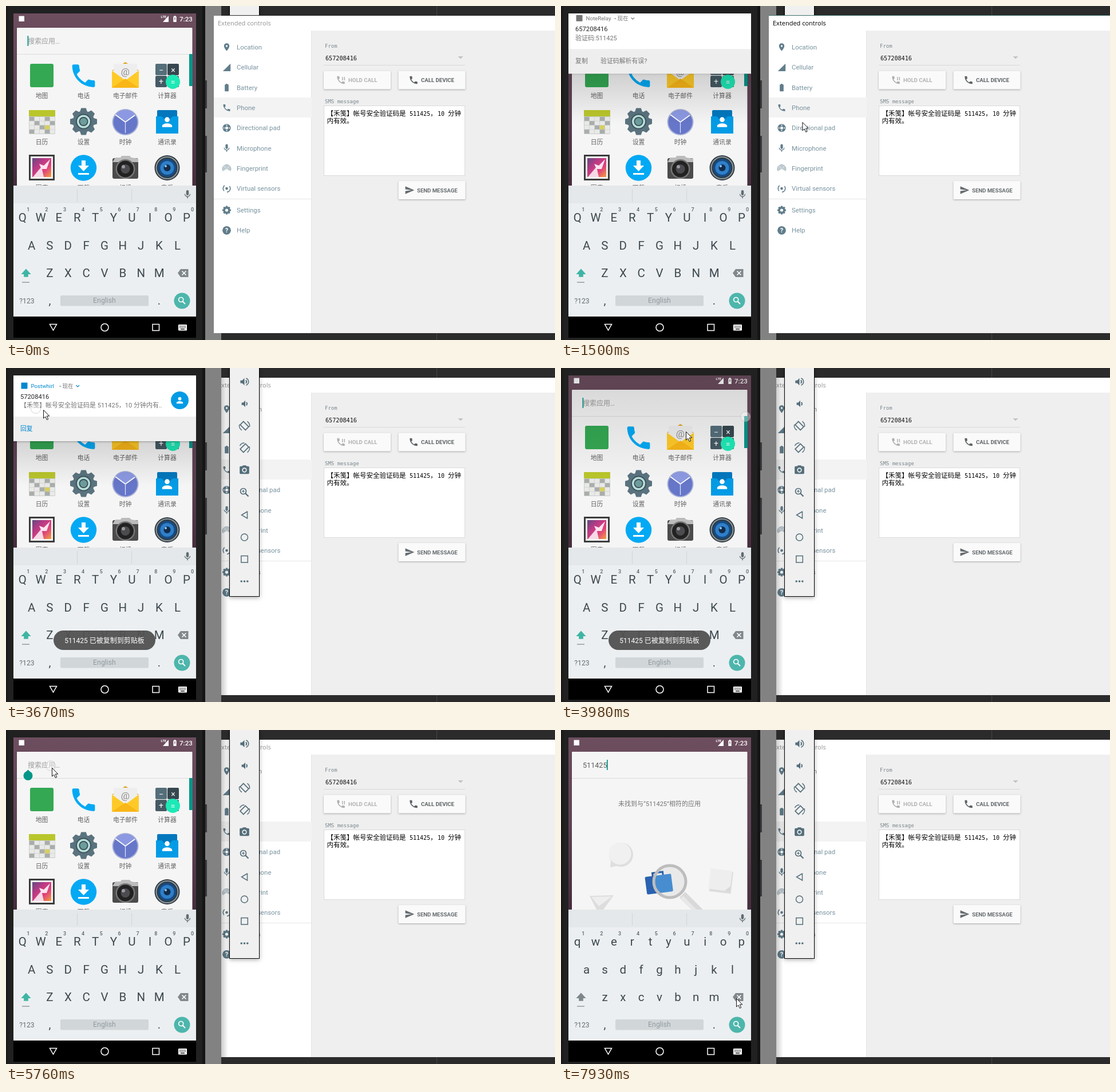
Recreate the animation shown at these times as an HTML page with a canvas. Size 959 by 584 pixels, loop 8 s.

```html
<!DOCTYPE html>
<html lang="zh">
<head>
<meta charset="utf-8">
<title>SMS code demo</title>
<style>
html, body { margin: 0; width: 100%; height: 100%; overflow: hidden; background: #2b2b2b; }
canvas { display: block; width: 100%; height: 100%; }
</style>
</head>
<body>
<canvas id="stage" width="959" height="584"></canvas>
<script>
const LOOP = 8000;
const c = document.getElementById('stage').getContext('2d');
const UI = 'Roboto, "Noto Sans CJK SC", "Noto Sans CJK JP", sans-serif';
const MONO = '"DejaVu Sans Mono", "Noto Sans CJK SC", monospace';
const TITLE = '"Open Sans", sans-serif';
const SLATE = '#607d8b', TEAL = '#009688';
const SENDER = '657208416', CODE = '511425';

const PHONE = 'M6.6 10.8c1.4 2.8 3.8 5.1 6.6 6.6l2.2-2.2c.3-.3.7-.4 1-.2 1.1.4 2.3.6 3.6.6.5 0 1 .4 1 1V20c0 .5-.5 1-1 1C10.6 21 3 13.4 3 4c0-.5.5-1 1-1h3.5c.5 0 1 .5 1 1 0 1.2.2 2.4.6 3.6.1.3 0 .7-.3 1z';
const PLACE = 'M12 2C8.1 2 5 5.1 5 9c0 5.3 7 13 7 13s7-7.7 7-13c0-3.9-3.1-7-7-7zM12 6.5a2.5 2.5 0 1 0 0 5a2.5 2.5 0 1 0 0-5z';
const SIGNAL = 'M2 22h20V2z';
const BATTERY = 'M8 4h2V2h4v2h2q1 0 1 1v16q0 1-1 1H8q-1 0-1-1V5q0-1 1-1z';
const MIC = 'M12 14c1.7 0 3-1.3 3-3V5a3 3 0 0 0-6 0v6c0 1.7 1.3 3 3 3zm5.3-3c0 3-2.5 5.1-5.3 5.1S6.7 14 6.7 11H5c0 3.4 2.7 6.2 6 6.7V21h2v-3.3c3.3-.5 6-3.3 6-6.7z';
const SEND = 'M2 21L23 12L2 3v7l15 2l-15 2z';
const SPEAKER = 'M3 9v6h4l5 5V4L7 9z';
const CAMERA = 'M9 2L7.2 4H4a2 2 0 0 0-2 2v12a2 2 0 0 0 2 2h16a2 2 0 0 0 2-2V6a2 2 0 0 0-2-2h-3.2L15 2zM12 7a5 5 0 1 0 0 10a5 5 0 1 0 0-10zM12 9a3 3 0 1 1 0 6a3 3 0 1 1 0-6z';
const PERSON = 'M12 12a4 4 0 1 0 0-8a4 4 0 1 0 0 8zM12 14c-2.7 0-8 1.3-8 4v2h16v-2c0-2.7-5.3-4-8-4z';
const SHIFT = 'M12 3L3 13h5v5h8v-5h5z';

// Pointer path: time, x, y
const PATH = [
  [70, 958, 430], [600, 748, 322], [950, 745, 322], [1180, 575, 280], [1260, 575, 280],
  [1660, 320, 152], [2250, 30, 110], [2900, 30, 110], [3500, 47, 70], [3660, 65, 73],
  [3740, 65, 73], [3860, 346, 84], [3975, 218, 111], [4050, 218, 111], [4180, 130, 186],
  [4440, 92, 74], [4600, 80, 66], [6000, 80, 66], [6350, 62, 110], [6750, 62, 110],
  [7400, 300, 455], [7650, 306, 469]
];

const clamp = v => Math.max(0, Math.min(1, v));
const ramp = (t, a, b) => clamp((t - a) / (b - a));
const ease = p => 1 - Math.pow(1 - p, 3);
const within = (t, a, b) => t >= a && t < b;

function box(x, y, w, h, col, r = 0) {
  c.fillStyle = col;
  c.beginPath();
  c.roundRect(x, y, w, h, r);
  c.fill();
}
function disc(x, y, r, col) {
  c.fillStyle = col;
  c.beginPath();
  c.arc(x, y, r, 0, Math.PI * 2);
  c.fill();
}
function ring(x, y, r, col, w, a = 0, b = Math.PI * 2) {
  c.strokeStyle = col;
  c.lineWidth = w;
  c.beginPath();
  c.arc(x, y, r, a, b);
  c.stroke();
}
function trace(p) {
  c.beginPath();
  for (let i = 0; i < p.length; i += 2) c.lineTo(p[i], p[i + 1]);
}
function poly(col, ...p) {
  trace(p);
  c.fillStyle = col;
  c.fill();
}
function line(col, w, ...p) {
  trace(p);
  c.strokeStyle = col;
  c.lineWidth = w;
  c.stroke();
}
function frame(x, y, w, h, col, lw) {
  c.strokeStyle = col;
  c.lineWidth = lw;
  c.strokeRect(x, y, w, h);
}
function blend(x, y, w, h, dx, dy, cols) {
  const g = c.createLinearGradient(x, y, x + dx, y + dy);
  cols.forEach((col, i) => g.addColorStop(i / (cols.length - 1), col));
  box(x, y, w, h, g);
}
const fade = (x, y, w, h, ...cols) => blend(x, y, w, h, 0, h, cols);
const fadeRight = (x, y, w, h, ...cols) => blend(x, y, w, h, w, 0, cols);

function text(s, x, y, size, col, { font = UI, weight = 400, align = 'left' } = {}) {
  c.font = `${weight} ${size}px ${font}`;
  c.textAlign = align;
  c.fillStyle = col;
  c.fillText(s, x, y + size * 0.36);
}
const mid = (s, x, y, size, col, weight) => text(s, x, y, size, col, { weight, align: 'center' });

function local(x, y, draw, turn = 0, scale = 1) {
  c.save();
  c.translate(x, y);
  c.rotate(turn);
  c.scale(scale, scale);
  draw();
  c.restore();
}
function icon(path, x, y, size, col) {
  local(x, y, () => {
    c.translate(-12, -12);
    c.fillStyle = col;
    c.fill(new Path2D(path), 'evenodd');
  }, 0, size / 24);
}
function gear(x, y, r, col) {
  disc(x, y, r * 0.8, col);
  for (let i = 0; i < 8; i++) {
    local(x, y, () => poly(col, -r * .28, -r * .7, -r * .18, -r, r * .18, -r, r * .28, -r * .7), i * Math.PI / 4);
  }
}
function clipped(x, y, w, h, draw) {
  c.save();
  c.beginPath();
  c.rect(x, y, w, h);
  c.clip();
  draw();
  c.restore();
}
function shadowed(draw, blur = 3, dy = 1) {
  c.save();
  c.shadowColor = 'rgba(0,0,0,.3)';
  c.shadowBlur = blur;
  c.shadowOffsetY = dy;
  draw();
  c.restore();
}

function desktop() {
  box(0, 0, 959, 584, '#2b2b2b');
  box(752, 0, 1, 584, '#464646');
}

function emulator() {
  box(0, 0, 376, 584, '#828282');
  box(347, 130, 4, 49, '#3a3a3f');
  box(347, 227, 4, 64, '#3a3a3f');
  box(0, 0, 348, 584, '#212121');
  fadeRight(0, 0, 6, 584, '#181818', '#212121');
  box(343, 0, 5, 584, '#151515');
}

function navItems() {
  const names = ['Location', 'Cellular', 'Battery', 'Phone', 'Directional pad',
    'Microphone', 'Fingerprint', 'Virtual sensors', 'Settings', 'Help'];
  const rowY = i => 72 + i * 35.3 + (i > 7 ? 2.6 : 0);
  names.forEach((s, i) => text(s, 403, rowY(i), 11.4, '#78939f'));
  [PLACE, SIGNAL, BATTERY, PHONE].forEach((p, i) => icon(p, 385.5, rowY(i), 16, SLATE));
  disc(385.5, rowY(4), 7, SLATE);
  disc(385.5, rowY(4), 2.5, '#fff');
  for (let i = 0; i < 4; i++) {
    local(385.5, rowY(4), () => poly('#fff', -1.8, -5.4, 1.8, -5.4, 0, -3.4), i * Math.PI / 2);
  }
  icon(MIC, 385.5, rowY(5), 17, SLATE);
  for (let r = 1; r < 8; r += 1.6) ring(385.5, rowY(6) + 1, r, SLATE, .7, 2.6, 6.8);
  ring(385.5, rowY(7), 6.3, SLATE, 1.6, -.7, 1.5);
  ring(385.5, rowY(7), 6.3, SLATE, 1.6, 2.4, 4.1);
  disc(385.5, rowY(7), 2.3, SLATE);
  gear(385.5, rowY(8), 7.5, SLATE);
  disc(385.5, rowY(8), 2.6, '#fff');
  disc(385.5, rowY(9), 7.4, SLATE);
  mid('?', 385.5, rowY(9), 11, '#fff', 700);
}

function button(x, y, w, h, label, labelX, path, col, pressed) {
  shadowed(() => box(x, y, w, h, pressed ? '#e2e2e2' : '#fafafa', 1.5));
  icon(path, labelX - 13, y + h / 2, 18, col);
  text(label, labelX, y + h / 2 + .5, 9.6, col, { weight: 700 });
}

function controls(active, pressed) {
  box(363, 17, 596, 555, '#fff');
  if (active) box(363, 16, 596, 1, '#3f6f6c');
  text('Extended controls', 370, 30, 11, active ? '#000' : '#949494', { font: TITLE });
  box(534, 43, 425, 529, '#efefef');
  box(533, 43, 1, 529, '#e4e4e4');
  box(363, 160, 171, 35, '#f3f3f3');
  box(363, 337, 171, 1, '#e6e6e6');
  navItems();

  const mono = { font: MONO };
  text('From', 557, 70, 9, '#78868c', mono);
  text(SENDER, 558, 91, 10.15, '#111', mono);
  box(555, 103, 247, 1, '#d9d9d9');
  poly('#c2c2c2', 789.5, 88, 798.5, 88, 794, 92.5);
  button(555, 113.5, 117, 32, 'HOLD CALL', 598, PHONE, '#b1b1b1');
  box(587, 124, 1.5, 6, '#b1b1b1');
  box(590.5, 124, 1.5, 6, '#b1b1b1');
  button(685.5, 113.5, 117, 32, 'CALL DEVICE', 725, PHONE, '#5c6265');
  text('SMS message', 557, 167, 9, '#78868c', mono);
  box(555, 174, 247, 123, '#fff');
  frame(555.5, 174.5, 246, 122, '#dadada', 1);
  text('【禾笺】帐号安全验证码是', 560.5, 187.5, 11.5, '#000');
  text(CODE, 705, 188, 10, '#000', mono);
  text('，', 741, 187.5, 11.5, '#000');
  text('10', 754, 188, 10, '#000', mono);
  text('分钟', 772, 187.5, 11.5, '#000');
  text('内有效。', 560.5, 200.5, 11.5, '#000');
  button(685.5, 306, 117, 32, 'SEND MESSAGE', 718, SEND, '#666c70', pressed);
}

function toolbar() {
  shadowed(() => box(390, -2, 53, 402, '#000'), 7, 2);
  box(391, -2, 51, 401, '#f0f0f0');
  const x = 416.5, col = '#546e7a';
  icon(SPEAKER, x, 24, 19, col);
  ring(417, 24, 3.2, col, 2, -1, 1);
  ring(417, 24, 6.7, col, 1.6, -1.2, 1.2);
  icon(SPEAKER, x + 1.5, 62.5, 17, col);
  ring(418, 62.5, 3, col, 2, -1, 1);
  [[101, 1], [140, -1]].forEach(([y, s]) => {
    local(x, y, () => frame(-4, -6.5, 8, 13, col, 1.7), -s * Math.PI / 4);
    ring(x, y, 9, col, 1.5, s > 0 ? 2.1 : -.3, s > 0 ? 3.4 : 1);
    ring(x, y, 9, col, 1.5, s > 0 ? -1 : 3.6, s > 0 ? .2 : 4.7);
  });
  icon(CAMERA, x, 178.5, 20, col);
  ring(414.5, 215.5, 5, col, 1.7);
  line(col, 2.2, 418, 219, 423.5, 224.5);
  line(col, 1.2, 412, 215.5, 417, 215.5);
  line(col, 1.2, 414.5, 213, 414.5, 218);
  line(col, 1.5, 421.5, 251, 411.5, 257, 421.5, 263, 421.5, 250.5);
  ring(x, 296, 6, col, 1.5);
  frame(x - 5.7, 328.5, 11.5, 11.5, col, 1.5);
  [-5.3, 0, 5.3].forEach(d => disc(x + d, 373, 1.8, col));
}

function statusBar(t) {
  const alert = within(t, 1100, 2750);
  if (alert) box(21.5, 17, 11, 11, '#e9e4e7');
  box(alert ? 41 : 22.5, 17.5, 9.5, 9.5, '#fff');
  text('LTE', 270.5, 19, 6, '#fff', { weight: 700 });
  poly('#fff', 274, 28, 284, 28, 284, 17);
  icon(BATTERY, 295, 22.5, 13, '#fff');
  box(294.4, 20, 1.2, 4, '#6e5061');
  text('7:23', 303, 23, 11.6, '#fff', { weight: 500 });
}

function rowOne() {
  box(42, 101, 41, 41, '#34a853', 3);
  icon(PHONE, 135.5, 122, 53, '#03a9f4');
  poly('#e0a21a', 185, 113, 208.5, 98, 232, 113);
  box(188, 101, 41, 32, '#eeeeee', 2);
  mid('@', 208.5, 115, 17, '#8f8f8f');
  poly('#ffca28', 185, 113, 208.5, 130, 232, 113, 232, 143, 185, 143);
  poly('#f9b618', 185, 143, 208.5, 127, 232, 143);
  box(261, 101, 20, 20, '#546e7a', 2);
  box(282, 101, 20, 20, '#37474f', 2);
  box(261, 122, 20, 20, '#455a64', 2);
  box(282, 122, 20, 20, '#455a64', 2);
  disc(291.5, 132.5, 12.5, '#1de9b6');
  mid('−', 271, 111.5, 14, '#fff');
  mid('×', 292, 111.5, 14, '#fff');
  mid('+', 271, 132, 14, '#fff');
  mid('=', 291.5, 132.5, 14, '#fff');
}
function rowTwo() {
  box(40, 182, 46, 42, '#c9cccb', 1);
  box(40, 182, 46, 11, '#b9c62b', 1);
  for (let i = 0; i < 20; i++) {
    const col = i === 13 ? '#d8cf5a' : (i * 7) % 3 ? '#e9eae8' : '#a9adab';
    box(41 + i % 5 * 9, 194 + Math.floor(i / 5) * 7.4, 8.2, 6.8, col);
  }
  gear(135.5, 202, 23.5, '#5a737f');
  disc(135.5, 202, 13.5, '#3f525b');
  disc(135.5, 202, 11.5, '#b7e0dc');
  disc(135.5, 202, 8, '#37474f');
  disc(135.5, 202, 6.3, '#6d9c9c');
  disc(208.5, 203, 23, '#a6afd8');
  disc(208.5, 203, 21, '#6676c8');
  c.fillStyle = '#8c99e2';
  c.beginPath();
  c.moveTo(208.5, 203);
  c.arc(208.5, 203, 21, -2.5, -.6);
  c.fill();
  line('#fff', 1.8, 191, 190, 208.5, 203, 225, 191);
  line('#e3e6fa', 1.2, 208.5, 203, 208.5, 222);
  box(264, 182, 35, 24, '#0277bd', 2);
  poly('#039be5', 262, 193, 272, 193, 277, 198, 286, 198, 291, 193, 301, 193, 301, 223, 262, 223);
  icon(PERSON, 281.5, 203, 26, '#fff');
}
function rowThree() {
  box(40, 260, 45, 45, '#3c3c3c');
  box(43, 263, 39, 39, '#f2f2f2');
  blend(46, 266, 33, 33, 33, 33, ['#5f4a80', '#b83a86', '#e0447c', '#f3a13a']);
  poly('#f7d9e6', 47, 299, 62, 281, 66, 299);
  poly('#ffe3ef', 58, 276, 66, 279, 77, 268, 71, 285, 62, 285);
  disc(135.5, 283, 22.7, '#03a9f4');
  poly('#fff', 132, 270, 139, 270, 139, 279, 145, 279, 135.5, 289, 126, 279, 132, 279);
  box(126, 292, 19, 3, '#fff');
  box(186, 266, 45, 36, '#4b4b4b', 3);
  poly('#bcbcbc', 186, 273, 191, 265, 200, 265, 202, 262, 216, 262, 219, 265, 231, 267, 231, 273);
  disc(208.5, 285, 17, '#777');
  disc(208.5, 285, 14.5, '#222');
  disc(208.5, 285, 8, '#4c4c50');
  disc(205, 281, 3, '#9a9aa0');
  disc(281.5, 283, 22, '#303a40');
  ring(281.5, 283, 19, '#8d999f', 2);
  disc(281.5, 283, 16, '#174b82');
  disc(281.5, 283, 12, '#2e7fca');
  disc(281.5, 283, 6, '#132c49');
  disc(279, 280, 2, '#8fc4f4');
}

function apps() {
  box(320, 84, 6, 56, TEAL);
  rowOne();
  rowTwo();
  rowThree();
  [['地图', '电话', '电子邮件', '计算器'], ['日历', '设置', '时钟', '通讯录'], ['图库', '下载', '相机', '音乐']]
    .forEach((row, j) => row.forEach((s, i) => mid(s, 62.5 + i * 73, 157.5 + j * 80.5, 10.8, '#616161')));
}

function noResult() {
  mid(`未找到与“${CODE}”相符的应用`, 172, 129, 11, '#757575');
  disc(105, 218, 21, '#dedede');
  poly('#dedede', 87, 228, 86, 240, 102, 237);
  disc(103, 216, 19.5, '#f0f0f0');
  local(278, 264, () => {
    box(-17, -18, 38, 38, '#dcdcdc');
    box(-19, -20, 38, 36, '#eeeeee');
    poly('#d8d8d8', 10, 16, 19, 16, 19, 7);
  }, .12);
  poly('#dddddd', 50, 290, 92, 289, 74, 314, 62, 314);
  poly('#eeeeee', 53, 292, 89, 291, 66, 308);
  line('#d9d9d9', 14, 212, 288, 250, 326);
  line('#e8e8e8', 6, 211, 292, 244, 326);
  const bag = (body, rim) => local(171, 268, () => {
    frame(-9, -19, 18, 9, rim, 3);
    box(-23, -14, 46, 31, body, 2);
  }, -.13);
  bag('#2a62b0', '#2456a0');
  c.save();
  c.beginPath();
  c.arc(190, 265, 27, 0, Math.PI * 2);
  c.clip();
  box(160, 235, 60, 60, '#e9e9e9');
  bag('#478dd0', '#2a62b0');
  c.restore();
  ring(190, 265, 28, '#bdbdbd', 5);
}

function drawer(t) {
  const pasted = t >= 6640;
  fade(13, 13, 319, 301, '#6d4e5f', '#614457', '#472d3e');
  statusBar(t);
  shadowed(() => box(19, 38, 306.5, 280, '#f5f5f5', 1));
  box(19, 84, 306.5, 1, '#dcdcdc');
  if (pasted) {
    text(CODE, 38, 61.5, 12.6, '#5c5c5c');
    noResult();
  } else {
    text('搜索应用…', 38, 61.5, 12, '#9c9c9c');
    apps();
  }
  const blink = pasted ? (t - 6650) % 1000 : (t + 60) % 1000;
  if (blink < 500) box(pasted ? 80 : 37.5, 52, 1.7, 18, TEAL);
  if (within(t, 5450, 6640)) {
    disc(38.5, 80, 8, TEAL);
    poly(TEAL, 38.5, 69.5, 45, 76, 32, 76);
  }
  c.globalAlpha = ramp(t, 5850, 6020) * (1 - ramp(t, 6620, 6720));
  if (c.globalAlpha) {
    shadowed(() => box(31, 91, 56, 36, '#fff', 2), 4);
    mid('粘贴', 59, 109, 11.5, '#333');
  }
  c.globalAlpha = 1;
}

function keyboard(lower) {
  box(13, 314, 319, 229, '#eceff1');
  box(13, 314, 319, 31, '#e4e8ea');
  box(124, 320, 1, 22, '#d0d5d7');
  box(219, 320, 1, 22, '#d0d5d7');
  icon(MIC, 317, 329.5, 18, '#5f6b70');
  const ink = '#3c484e';
  ['QWERTYUIOP', 'ASDFGHJKL', 'ZXCVBNM'].forEach((row, j) => [...row].forEach((k, i) => {
    const x = [28.7, 44.6, 76.5][j] + i * 31.85;
    mid(lower ? k.toLowerCase() : k, x, 369.5 + j * 48.8, 20.5, ink);
    if (!j) mid((i + 1) % 10, x + 10.2, 356, 9, '#566268', 500);
  }));
  icon(SHIFT, 35, 468, 23, lower ? '#7d878b' : '#3eb5a4');
  box(28, 482.5, 13, 1.2, '#7d878b');
  poly('#80888c', 300, 467, 305, 460, 318.5, 460, 318.5, 474, 305, 474);
  line('#fff', 1.6, 307.5, 463.5, 314.5, 470.5);
  line('#fff', 1.6, 314.5, 463.5, 307.5, 470.5);
  mid('?123', 36.5, 515.5, 12.2, '#626d72');
  mid(',', 76.5, 515, 20, ink);
  mid('.', 267.5, 515, 20, ink);
  box(95, 506, 154, 18.5, '#d1d6d9', 2);
  mid('English', 172, 515, 12.3, '#929a9e');
  disc(307.5, 515.5, 14, '#4db6ac');
  ring(305.7, 513.5, 4, '#fff', 1.7);
  line('#fff', 2, 308.5, 516.5, 313, 521);
}

function navBar() {
  box(13, 543, 319, 37, '#000');
  line('#fff', 1.5, 76.5, 556.5, 88.5, 556.5, 82.5, 567, 76.5, 556.5, 78, 556.5);
  ring(172.5, 562, 6.5, '#fff', 1.5);
  frame(256, 556.5, 11.5, 11, '#fff', 1.5);
  box(301, 557, 15, 10.5, '#fff', 1);
  for (let i = 0; i < 10; i++) box(303 + i % 5 * 2.4, 559 + Math.floor(i / 5) * 2.5, 1.3, 1.3, '#000');
  box(305, 564.3, 7, 1.3, '#000');
}

function card(chat) {
  shadowed(() => box(13, 13, 319, 115, '#fff'), 3, 1);
  box(13, 85, 319, 43, '#eeeeee');
  const tint = chat ? '#0288d1' : '#757575';
  box(26.5, 25.5, 11, 11, tint, 1);
  text(chat ? 'Postwhirl' : 'NoteRelay', 43.5, 31.5, 9.7, tint);
  text('• 现在', 93, 31.5, 9.5, '#757575');
  line(tint, 1.2, 122.5, 30, 125.3, 32.8, 128, 30);
  text(chat ? SENDER.slice(1) : SENDER, 25, 50, 11.2, '#262626');
  if (chat) {
    text(`【禾笺】帐号安全验证码是 ${CODE}，10 分钟内有..`, 25, 65.5, 11, '#757575');
    disc(303.5, 56.5, 15.5, '#039be5');
    icon(PERSON, 303.5, 56.5, 17, '#fff');
    text('回复', 25, 106, 10.8, tint);
  } else {
    text('验证码:' + CODE, 25, 65.5, 11, '#757575');
    text('复制', 25, 106, 10.9, tint);
    text('验证码解析有误?', 69, 106, 10.9, tint);
  }
}

function headsUp(t) {
  const sms = ease(ramp(t, 1300, 1650)) * (1 - ramp(t, 2750, 2920));
  const chat = ease(ramp(t, 2950, 3300));
  const swipe = ramp(t, 3750, 3890);
  // Scrim behind the notification, fading towards the app list
  c.globalAlpha = ramp(t, 1130, 1300) * (1 - ramp(t, 3860, 4060));
  fade(13, 13, 319, 194, 'rgba(0,0,0,.33)', 'rgba(0,0,0,0)');
  c.globalAlpha = 1 - swipe;
  if (sms) local(0, -125 * (1 - sms), () => card(false));
  if (chat && swipe < 1) local(330 * swipe, -125 * (1 - chat), () => card(true));
  c.globalAlpha = 1;
}

function toast(t) {
  c.globalAlpha = ramp(t, 2850, 3050) * (1 - ramp(t, 4930, 5200));
  if (c.globalAlpha) {
    box(83, 459, 178, 34, 'rgba(82,82,82,.95)', 17);
    mid(`${CODE} 已被复制到剪贴板`, 172, 476.5, 12, '#fff');
  }
  c.globalAlpha = 1;
}

function pointerAt(t) {
  const i = PATH.findIndex(k => k[0] > t);
  if (i < 0) return PATH[PATH.length - 1].slice(1);
  if (i === 0) return null;
  const [t0, x0, y0] = PATH[i - 1], [t1, x1, y1] = PATH[i];
  const p = (t - t0) / (t1 - t0);
  return [x0 + (x1 - x0) * p, y0 + (y1 - y0) * p];
}

function touchDot(t) {
  let x = 78, y = 62.5;
  if (within(t, 3590, 4060)) {
    const p = ramp(t, 3750, 3870);
    x = 52 + 270 * p;
    y = 71 + 14 * p;
  } else if (!within(t, 4680, 4920) && !within(t, 5740, 6000)) return;
  disc(x, y, 9, 'rgba(255,255,255,.35)');
  ring(x, y, 8.5, 'rgba(150,150,150,.4)', 1);
}

function pointer(t) {
  const at = pointerAt(t);
  if (!at) return;
  const [x, y] = at;
  if (x > 556 && x < 801 && y > 175 && y < 297) {
    line('#333', 1, x + .5, y - 7, x + .5, y + 7);
    [-7.5, 7.5].forEach(d => line('#333', 1, x - 2.5, y + d, x + 3.5, y + d));
    return;
  }
  local(x, y, () => {
    const shape = [.5, .5, .5, 15, 3.8, 12, 6.3, 17.5, 8.7, 16.5, 6.3, 11, 10.8, 11, .5, .5];
    poly('#fff', ...shape);
    line('#111', 1, ...shape);
  });
}

function draw(t) {
  const raised = t >= 2580;
  const active = within(t, 630, 2580);
  desktop();
  if (raised) {
    controls(false, false);
    emulator();
    fadeRight(376, 17, 12, 555, 'rgba(0,0,0,.2)', 'rgba(0,0,0,0)');
    toolbar();
  } else {
    emulator();
    toolbar();
    box(376, 16, 70, 568, '#2b2b2b');
    controls(active, within(t, 630, 900));
  }
  clipped(13, 13, 319, 567, () => {
    clipped(13, 13, 319, 301, () => drawer(t));
    keyboard(t >= 6720);
    navBar();
    headsUp(t);
    toast(t);
    touchDot(t);
  });
  pointer(t);
}

function tick(now) {
  draw(now % LOOP);
  requestAnimationFrame(tick);
}
draw(0);
requestAnimationFrame(tick);
</script>
</body>
</html>
```
